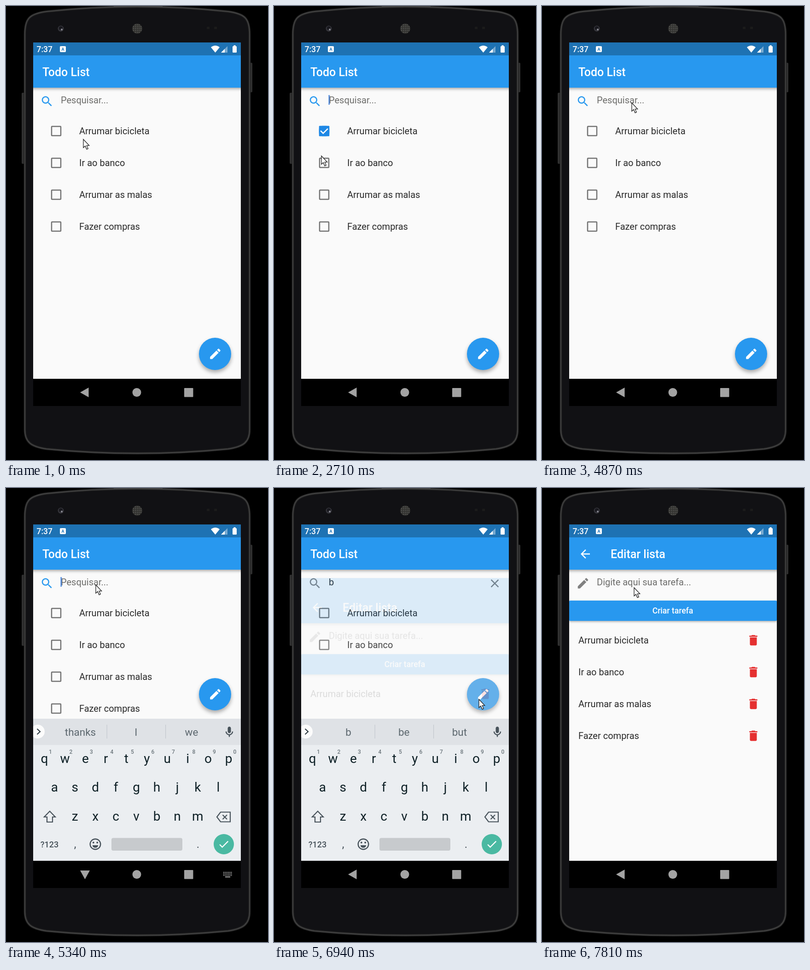
These frames come from a looping animation (569x984 px, 8 s). An HTML page with a canvas:

```html
<!DOCTYPE html>
<html lang="pt">
<head>
<meta charset="utf-8">
<title>Todo List</title>
<style>
html, body { margin: 0; width: 100%; height: 100%; overflow: hidden; background: #000; }
canvas { display: block; }
</style>
</head>
<body>
<canvas id="stage" width="569" height="984"></canvas>
<script>
const LOOP = 8000, W = 569, H = 984;
const LEFT = 59, RIGHT = 510, TOP = 79, BOTTOM = 808;
const BLUE = '#2898ef', PAPER = '#fafafa', INK = 'rgba(0,0,0,.84)', HINT = '#6c6c6a', GREY = '#808080';
const TASKS = ['Arrumar bicicleta', 'Ir ao banco', 'Arrumar as malas', 'Fazer compras'];

const ICONS = {
  search: 'M15.5 14h-.79l-.28-.27C15.41 12.59 16 11.11 16 9.5 16 5.91 13.09 3 9.5 3S3 5.91 3 9.5 5.91 16 9.5 16c1.61 0 3.09-.59 4.23-1.57l.27.28v.79l5 4.99L20.49 19l-4.99-5zm-6 0C7.01 14 5 11.99 5 9.5S7.01 5 9.5 5 14 7.01 14 9.5 11.99 14 9.5 14z',
  edit: 'M3 17.25V21h3.75L17.81 9.94l-3.75-3.75L3 17.25zM20.71 7.04c.39-.39.39-1.02 0-1.41l-2.34-2.34c-.39-.39-1.02-.39-1.41 0l-1.83 1.83 3.75 3.75 1.83-1.83z',
  trash: 'M6 19c0 1.1.9 2 2 2h8c1.1 0 2-.9 2-2V7H6v12zM19 4h-3.5l-1-1h-5l-1 1H5v2h14V4z',
  back: 'M20 11H7.83l5.59-5.59L12 4l-8 8 8 8 1.41-1.41L7.83 13H20v-2z',
  close: 'M19 6.41L17.59 5 12 10.59 6.41 5 5 6.41 10.59 12 5 17.59 6.41 19 12 13.41 17.59 19 19 17.59 13.41 12z',
  check: 'M9 16.17L4.83 12l-1.42 1.41L9 19 21 7l-1.41-1.41z',
  mic: 'M12 14c1.66 0 3-1.34 3-3V5c0-1.66-1.34-3-3-3S9 3.34 9 5v6c0 1.66 1.34 3 3 3zM17 11c0 2.8-2.2 5-5 5s-5-2.2-5-5H5c0 3.5 2.6 6.4 6 6.9V21h2v-3.1c3.4-.5 6-3.4 6-6.9z'
};
for (const name in ICONS) ICONS[name] = new Path2D(ICONS[name]);

const BODY = new Path2D('M41 62C41 28 50 17 88 12Q285 -9 482 12C520 17 529 28 529 62V918C529 945 516 955 482 960Q285 979 88 960C54 955 41 945 41 918Z');
const ARROW = new Path2D('M0 0V18L4 14.4L7.2 21.6L10.2 20.2L7.2 13.4H12.6Z');

const screen = document.getElementById('stage').getContext('2d');
const bufferCanvas = document.createElement('canvas');
bufferCanvas.width = W;
bufferCanvas.height = H;
const buffer = bufferCanvas.getContext('2d');
let c = screen;

// ---- timing helpers
const clamp = v => Math.max(0, Math.min(1, v));
const span = (t, start, length) => clamp((t - start) / length);
const smooth = u => u * u * (3 - 2 * u);
const between = (t, a, b) => t >= a && t < b;

function bezier(x1, y1, x2, y2) {
  const at = (s, a, b) => 3 * (1 - s) * (1 - s) * s * a + 3 * (1 - s) * s * s * b + s * s * s;
  return x => {
    let lo = 0, hi = 1;
    for (let i = 0; i < 18; i++) {
      const mid = (lo + hi) / 2;
      if (at(mid, x1, x2) < x) lo = mid; else hi = mid;
    }
    return at(lo, y1, y2);
  };
}
const fastOutSlowIn = bezier(.4, 0, .2, 1), easeIn = bezier(.42, 0, 1, 1);

// ---- drawing helpers
function rect(x, y, w, h, color, radius = 0) {
  c.fillStyle = color;
  c.beginPath();
  c.roundRect(x, y, w, h, radius);
  c.fill();
}
function disc(x, y, r, color) {
  c.fillStyle = color;
  c.beginPath();
  c.arc(x, y, r, 0, Math.PI * 2);
  c.fill();
}
function poly(points, color) {
  c.fillStyle = color;
  c.beginPath();
  points.forEach(([x, y]) => c.lineTo(x, y));
  c.closePath();
  c.fill();
}
function line(points, color, width, closed) {
  c.strokeStyle = color;
  c.lineWidth = width;
  c.beginPath();
  points.forEach(([x, y]) => c.lineTo(x, y));
  if (closed) c.closePath();
  c.stroke();
}
function text(str, x, y, size, color, weight = 400, align = 'left') {
  c.font = `${weight} ${size}px Roboto, sans-serif`;
  c.textAlign = align;
  c.fillStyle = color;
  c.fillText(str, x, y);
}
function icon(name, x, y, size, color) {
  c.save();
  c.translate(x - size / 2, y - size / 2);
  c.scale(size / 24, size / 24);
  c.fillStyle = color;
  c.fill(ICONS[name]);
  c.restore();
}
function shadowed(blur, dy, alpha, draw) {
  c.save();
  c.shadowColor = `rgba(0,0,0,${alpha})`;
  c.shadowBlur = blur;
  c.shadowOffsetY = dy;
  draw();
  c.restore();
}
function clipped(x, y, w, h, draw) {
  c.save();
  c.beginPath();
  c.rect(x, y, w, h);
  c.clip();
  draw();
  c.restore();
}
function layer(alpha, dy, draw) {
  if (alpha <= 0) return;
  buffer.clearRect(0, 0, W, H);
  c = buffer;
  draw();
  c = screen;
  c.save();
  c.globalAlpha = alpha;
  c.drawImage(bufferCanvas, 0, dy);
  c.restore();
}

// ---- device
function phone() {
  rect(0, 0, W, H, '#000');
  rect(34, 188, 8, 154, '#303030', 2);
  rect(528, 123, 7, 64, '#303030', 2);
  c.fillStyle = '#111114';
  c.fill(BODY);
  c.strokeStyle = '#222222';
  c.lineWidth = 5;
  c.stroke(BODY);
  c.strokeStyle = '#444444';
  c.lineWidth = 1.8;
  c.stroke(BODY);
  rect(234, 0, 106, 2, '#404040');
  disc(119, 49, 6.5, '#34343a');
  disc(119, 48, 4, '#17171d');
  disc(121, 51, 2, '#8a8a92');
  disc(285, 49, 11, '#30302e');
  for (let y = -8; y <= 8; y += 4)
    for (let x = -8; x <= 8; x += 4)
      if (x * x + y * y < 100) disc(285 + x, 49 + y, 1.2, '#5a5a58');
  rect(436, 45, 6, 5, '#1b1b1b');
  rect(452, 45, 6, 5, '#1b1b1b');
}

function statusBar() {
  rect(LEFT, TOP, RIGHT - LEFT, 28, 'rgba(0,0,0,.25)');
  text('7:37', 66.5, 100, 17.5, '#fff', 500);
  rect(117, 87, 13, 13, '#fff', 2);
  text('A', 123.5, 97, 9, '#1970b6', 700, 'center');
  c.fillStyle = '#fff';
  c.beginPath();
  c.moveTo(454.5, 101);
  c.lineTo(445, 89.5);
  c.quadraticCurveTo(454.5, 82, 464, 89.5);
  c.fill();
  poly([[467, 101], [481, 101], [481, 87]], 'rgba(255,255,255,.4)');
  poly([[467, 101], [475, 101], [475, 93]], '#fff');
  rect(492, 87, 9, 14, '#fff', 1.5);
  rect(494.5, 85, 4, 3, '#fff');
}

function navIcons(down, imeSwitch) {
  const color = 'rgba(255,255,255,.64)';
  poly(down ? [[161, 829], [182, 829], [171.5, 848]] : [[161, 837.5], [179.5, 827], [179.5, 848]], color);
  disc(284, 837.5, 9.5, color);
  rect(387, 828, 19.5, 19.5, color, 1);
  if (!imeSwitch) return;
  for (let row = 0; row < 3; row++)
    for (let i = 0; i < 6; i++) rect(472 + i * 3.3, 832 + row * 3.3, 2, 2, color);
  rect(476, 842, 11, 2, color);
}

// ---- app
function appBar(title, x) {
  shadowed(6, 3, .32, () => rect(LEFT - 8, TOP, RIGHT - LEFT + 16, 98, BLUE));
  text(title, x, 152, 25, '#fff', 500);
}

const CLICKS = [[160, 3750], [3080, 4150]];

function checkbox(x, y, value) {
  const size = 22.5, left = x - size / 2, top = y - size / 2;
  const fill = clamp(value * 2), mark = clamp(value * 2 - 1);
  const width = 2.5 + fill * (size / 2 - 2.5);
  const color = value > 0 ? '#1e88e5' : '#737373';
  c.strokeStyle = color;
  c.lineWidth = width;
  c.beginPath();
  c.roundRect(left + width / 2, top + width / 2, size - width, size - width, 1);
  c.stroke();
  if (!mark) return;
  rect(left, top, size, size, color, 1.5);
  const at = (px, py) => [left + px * size, top + py * size];
  const first = clamp(mark * 2), second = clamp(mark * 2 - 1);
  const points = [at(.15, .47), at(.15 + .25 * first, .47 + .25 * first)];
  if (second) points.push(at(.4 + .45 * second, .72 - .45 * second));
  line(points, '#fff', 2.5);
}

function ripple(t, click, x, y) {
  const age = t - click;
  if (!between(age, 0, 480)) return;
  const alpha = .12 * clamp(age / 80) * (1 - span(age, 200, 280));
  disc(x, y, 21 * smooth(clamp(age / 160)), `rgba(30,100,170,${alpha})`);
}

function caretVisible(t) {
  if (t < 370 || t >= 6890) return false;
  if (t < 5140) return Math.floor((t - 370) / 500) % 2 === 0;
  return t < 5580 || Math.floor((t - 5580) / 500) % 2 === 0;
}

function fab(t) {
  const y = between(t, 5200, 7010) ? 447 : 754;
  const splash = .22 * span(t, 6800, 100) * (1 - span(t, 6960, 150));
  shadowed(9, 5, .32, () => disc(454, y, 35, BLUE));
  disc(454, y, 35, `rgba(200,200,200,${splash})`);
  icon('edit', 454.5, y, 30, '#fff');
}

function listPage(t) {
  const typed = t >= 5580;
  rect(LEFT, TOP, RIGHT - LEFT, BOTTOM - TOP, PAPER);
  appBar('Todo List', 79);
  icon('search', 89, 206.7, 30, t < 6890 ? BLUE : GREY);
  if (typed) {
    text('b', 119, 210.5, 20, INK);
    icon('close', 479.5, 206.7, 30, GREY);
  } else {
    text('Pesquisar...', 119, 210.5, 20, HINT);
  }
  if (caretVisible(t)) rect(typed ? 130.5 : 118.5, 193, 2.4, 21, '#4a86dc');

  TASKS.slice(0, t < 5620 ? 4 : 2).forEach((task, i) => {
    const y = 271 + i * 69;
    const [on, off] = CLICKS[i] || [LOOP, LOOP];
    ripple(t, on, 109, y);
    ripple(t, off, 109, y);
    checkbox(109, y, t < off ? span(t, on, 200) : 1 - span(t, off, 200));
    text(task, 159, y + 7, 20, INK);
  });
  fab(t);
}

function editPage() {
  rect(LEFT, TOP, RIGHT - LEFT, BOTTOM - TOP, PAPER);
  appBar('Editar lista', 149);
  icon('back', 94, 143, 30, '#fff');
  icon('edit', 89, 206.5, 30, GREY);
  text('Digite aqui sua tarefa...', 119, 210.5, 20, HINT);
  shadowed(4, 2, .3, () => rect(LEFT, 244, RIGHT - LEFT, 44, BLUE, 2));
  text('Criar tarefa', 284, 272, 17.5, '#fff', 500, 'center');
  TASKS.forEach((task, i) => {
    text(task, 79, 337 + i * 69, 20, INK);
    icon('trash', 459, 330 + i * 69, 30, '#e53030');
  });
}

// ---- keyboard
function keyRow(letters, x, y) {
  [...letters].forEach((key, i) => text(key, x + i * 44.45, y, 28, '#0e2026', 400, 'center'));
}

function keyboard(t) {
  const dark = '#47525a';
  rect(LEFT, 500, RIGHT - LEFT, 308, '#ebeef1');
  rect(LEFT, 500, RIGHT - LEFT, 57, '#dfe2e6');
  clipped(LEFT, 500, 40, 57, () => disc(69, 528, 15, '#fcfcfc'));
  line([[67.5, 522], [74, 528], [67.5, 534]], '#2c3940', 2.2);
  rect(218.5, 513, 1.2, 30, '#c3c8cd');
  rect(346, 513, 1.2, 30, '#c3c8cd');
  const words = t < 5680 ? ['thanks', 'I', 'we'] : ['b', 'be', 'but'];
  words.forEach((word, i) => text(word, 161.5 + i * 120.7, 537, 22.5, '#5d686f', 400, 'center'));
  icon('mic', 485, 529, 28, dark);

  keyRow('qwertyuiop', 83.5, 596);
  [...'1234567890'].forEach((n, i) => text(n, 96.5 + i * 44.5, 576, 12, '#6d777d', 500, 'center'));
  keyRow('asdfghjkl', 105.3, 658);
  keyRow('zxcvbnm', 149.7, 721);

  line([[95, 700.5], [107, 713], [101, 713], [101, 724], [89, 724], [89, 713], [83, 713]], dark, 2.2, true);
  line([[458, 713], [466, 702.5], [487, 702.5], [487, 723.5], [466, 723.5]], dark, 2.2, true);
  line([[470.5, 708.5], [480, 718]], dark, 2.2);
  line([[480, 708.5], [470.5, 718]], dark, 2.2);

  text('?123', 94.5, 779, 18, dark, 500, 'center');
  text(',', 150, 780, 24, dark, 400, 'center');
  text('.', 417, 780, 24, dark, 400, 'center');
  c.strokeStyle = dark;
  c.lineWidth = 2.4;
  c.beginPath();
  c.arc(194, 772, 11.3, 0, Math.PI * 2);
  c.stroke();
  c.fillStyle = dark;
  c.beginPath();
  c.arc(194, 773.5, 6.3, .1, Math.PI - .1);
  c.fill();
  disc(189.8, 768.5, 1.9, dark);
  disc(198.2, 768.5, 1.9, dark);
  rect(229, 758.5, 154, 27.5, '#c7cacd', 4);
  disc(473, 772, 22, '#4ab9a2');
  icon('check', 473, 772, 27, '#fff');
}

function drawKeyboard(t) {
  if (!between(t, 5140, 7130)) return;
  const shown = t < 6000 ? span(t, 5120, 200) : 1 - span(t, 6950, 180);
  const drop = 50 * Math.sin((1 - shown) * Math.PI / 2);
  layer(shown, drop, () => keyboard(t));
}

// ---- pointer: time, x, y
const PATH = [
  [40, 168, 289], [150, 122, 268], [2350, 122, 268], [2710, 103, 325], [2840, 105, 355],
  [3240, 105, 355], [3490, 104, 268], [3800, 104, 268], [4040, 104, 349], [4200, 104, 349],
  [4480, 200, 214], [4560, 195, 210], [6080, 195, 210], [6780, 445, 458], [7180, 445, 458],
  [7710, 198, 224], [7800, 200, 216]
];

function pointer(t) {
  let i = PATH.findIndex(p => p[0] > t);
  if (i < 0) i = PATH.length - 1;
  const b = PATH[i], a = PATH[Math.max(0, i - 1)];
  const u = smooth(span(t, a[0], b[0] - a[0] || 1));
  c.save();
  c.translate(a[1] + (b[1] - a[1]) * u, a[2] + (b[2] - a[2]) * u);
  c.fillStyle = '#fff';
  c.fill(ARROW);
  c.strokeStyle = '#222';
  c.lineWidth = 1.3;
  c.stroke(ARROW);
  c.restore();
}

function draw(t) {
  phone();
  clipped(LEFT, TOP, RIGHT - LEFT, BOTTOM - TOP, () => {
    const route = span(t, 6816, 400);
    if (route < 1) listPage(t);
    if (t >= 6910) layer(easeIn(route), 194 * (1 - fastOutSlowIn(route)), editPage);
    statusBar();
  });
  rect(LEFT, BOTTOM, RIGHT - LEFT, 59, '#000');
  drawKeyboard(t);
  const imeOpen = between(t, 5170, 6900);
  navIcons(imeOpen, imeOpen);
  pointer(t);
}

const start = performance.now();
function tick() {
  draw((performance.now() - start) % LOOP);
  requestAnimationFrame(tick);
}
tick();
</script>
</body>
</html>
```
